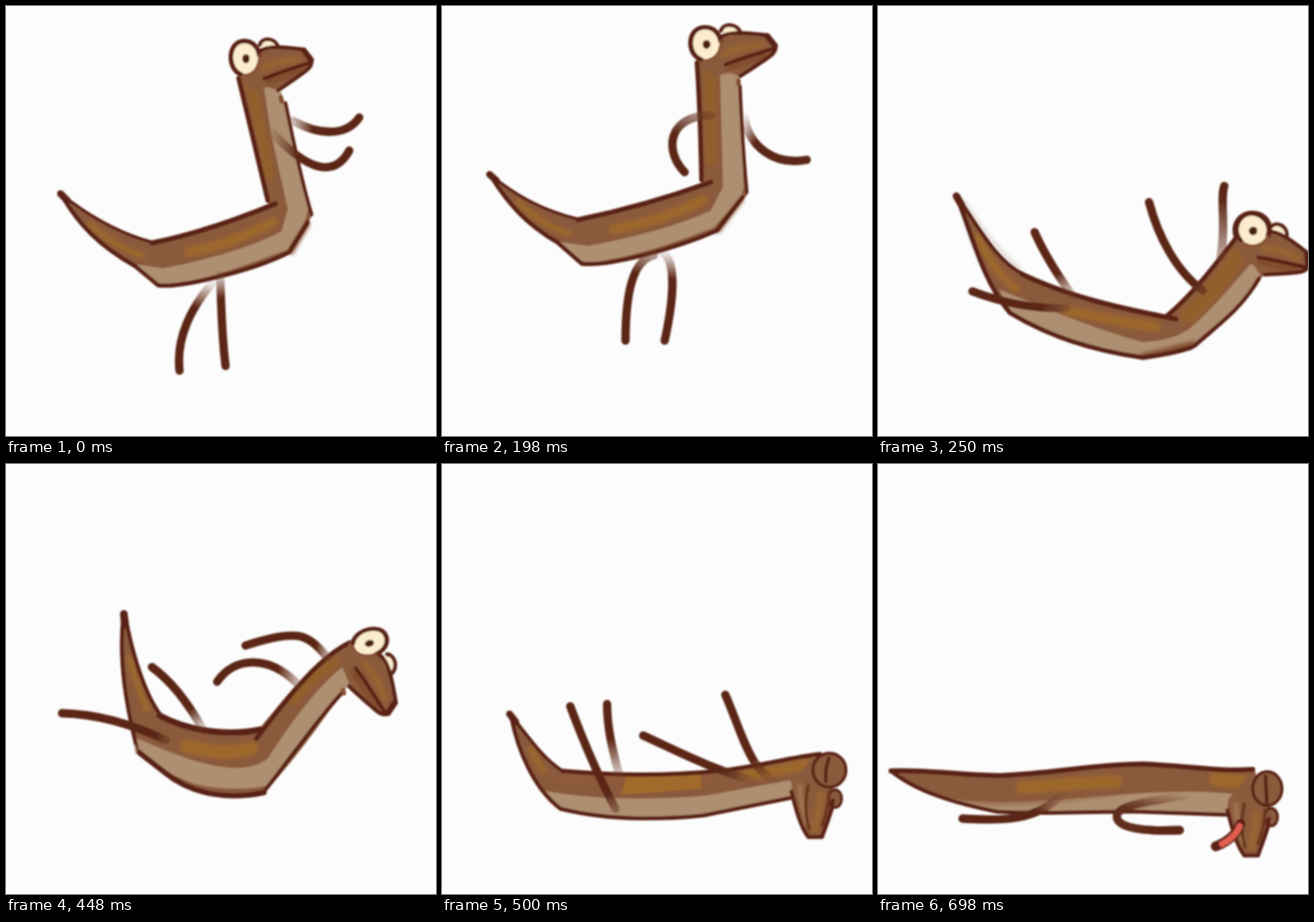
Write an HTML page that moves like this. It is 560 px wide and 559 px high and loops after 750 ms.

```html
<!DOCTYPE html>
<html lang="en">
<head>
<meta charset="utf-8">
<title>Collapsing lizard</title>
<style>
html, body { margin: 0; width: 100%; height: 100%; overflow: hidden; background: #fcfcfc; }
svg { display: block; width: 100%; height: 100%; }
path { stroke-linecap: round; stroke-linejoin: round; }
</style>
</head>
<body>
<svg id="stage" viewBox="0 0 560 559">
  <defs>
    <filter id="soft" filterUnits="userSpaceOnUse" x="-200" y="-200" width="960" height="960"><feGaussianBlur stdDeviation="0.85"/></filter>
    <filter id="smear" filterUnits="userSpaceOnUse" x="-200" y="-200" width="960" height="960"><feGaussianBlur stdDeviation="2"/></filter>
  </defs>
</svg>
<script>
const NS = 'http://www.w3.org/2000/svg';
const stage = document.getElementById('stage');
const defs = stage.querySelector('defs');
const INK = '#5a2413', BROWN = '#8b5a3c', BELLY = '#af8f71', OCHRE = '#a06a2b', CREAM = '#fdedcf';

function add(parent, tag, attrs) {
  const node = document.createElementNS(NS, tag);
  for (const key in attrs) node.setAttribute(key, attrs[key]);
  parent.appendChild(node);
  return node;
}

const fill = (d, color) => g => add(g, 'path', { d, fill: color });
const line = (d, width = 5, color = INK) => g =>
  add(g, 'path', { d, fill: 'none', stroke: color, 'stroke-width': width });
const glaze = (d, width, color = OCHRE, opacity = 0.85) => g =>
  add(g, 'path', { d, fill: 'none', stroke: color, 'stroke-width': width, opacity, filter: 'url(#smear)' });
const oval = (cx, cy, rx, ry, color, stroke = 'none', width = 0) => g =>
  add(g, 'ellipse', { cx, cy, rx, ry, fill: color, stroke, 'stroke-width': width });

// A limb runs from its tip to the body and fades out there.
let limbs = 0;
const limb = (d, end = 0.1, solid = 0.6) => g => {
  const n = d.match(/-?[\d.]+/g);
  const id = 'limb' + limbs++;
  const fade = add(defs, 'linearGradient', {
    id, gradientUnits: 'userSpaceOnUse', x1: n[0], y1: n[1], x2: n[n.length - 2], y2: n[n.length - 1]
  });
  add(fade, 'stop', { offset: solid, 'stop-color': '#5c2817' });
  add(fade, 'stop', { offset: 1, 'stop-color': '#6e3d28', 'stop-opacity': end });
  add(g, 'path', { d, fill: 'none', stroke: `url(#${id})`, 'stroke-width': 10.8 });
};

// Head with open eyes, placed by the centre of the near eye.
const head = (x, y, turn, { stretch = 1, eyeX = 1, eyeY = 1 } = {}) => g => {
  const place = `translate(${x} ${y}) rotate(${turn})`;
  const skull = add(g, 'g', { transform: `${place} scale(${stretch} 1)` });
  [
    fill('M-9 23L16 -6L38 -14L76 -11L88 3L81 15L42 42L30 38L10 42Z', BROWN),
    glaze('M24 13C40 5 55 2 68 2', 9, OCHRE, 0.6),
    glaze('M30 31C45 27 60 22 74 14', 6, '#7a4526', 0.8),
    oval(29, -17, 10, 6.5, CREAM),
    line('M19 -17C22 -27 39 -27 43 -14', 5),
    line('M18 -8C28 -17 52 -14 77 -11L87 2C87 9 84 13 80 16C67 26 55 34 43 42', 5),
    line('M76 -10L85 2', 7),
    line('M82 7C64 13 46 18 25 27', 5)
  ].forEach(draw => draw(skull));
  const eye = add(g, 'g', { transform: `${place} scale(${eyeX} ${eyeY})` });
  [
    oval(0, 0, 17.5, 20.5, CREAM),
    line('M-6 21C-24 14 -23 -22 -1 -22C10 -22 17 -13 18 -4', 6),
    line('M18 -4C19 10 12 20 2 22', 3, '#875130'),
    oval(1, 1, 4.8, 6, '#4c2111')
  ].forEach(draw => draw(eye));
};

// Head hanging down with closed eyes.
const droop = (dy, eyeX, eyeRx, lid) => g => {
  const h = add(g, 'g', { transform: `translate(0 ${dy})` });
  [
    fill('M456 412L484 380L506 392L512 445L496 486L477 487L455 428Z', BROWN),
    glaze('M466 418C466 438 472 455 476 468', 6, '#b08a66', 0.6),
    glaze('M493 430C492 446 489 462 486 474', 9, OCHRE, 0.7),
    oval(512, 435, 8.5, 11.5, BROWN, INK, 3.5),
    line('M455 426C461 449 467 472 477 485L495 485C500 469 508 454 509 437', 5),
    line('M477 418C472 438 473 456 478 474', 4, '#6a351e'),
    line('M504 426C504 443 500 456 495 470', 4, '#6a351e'),
    oval(eyeX, 398, eyeRx, 22, BROWN, INK, 4),
    line(lid, 4.5)
  ].forEach(draw => draw(h));
};

const poses = [
  { hold: 120, parts: [
    fill('M70 243C105 270 140 293 195 307C245 297 300 278 342 257L302 90L350 95L361 122L399 272L370 322C320 343 270 358 200 365L165 338C120 312 92 280 70 243Z', BROWN),
    fill('M336 106C350 100 360 108 361 122L394 262L389 280L366 317C310 337 262 357 200 364L163 335L205 341C262 330 320 314 359 293L367 264L345 165Z', BELLY),
    glaze('M318 102C326 135 335 175 343 220', 14, '#94602a'),
    glaze('M238 320C280 313 318 296 348 281', 13),
    glaze('M110 284C130 302 155 317 178 325', 8),
    glaze('M372 320L393 284', 6, '#85502f'),
    line('M71 244C105 271 145 295 190 307', 4),
    line('M190 308C245 297 300 278 351 257', 6.5),
    line('M303 94C315 145 330 205 341 253', 6),
    line('M72 245C95 285 122 312 168 338L198 363C225 367 320 345 369 320L393 281', 5.5),
    line('M364 126C373 170 384 225 398 271', 4.5),
    line('M71 244L80 253', 9),
    line('M358 119L359 124', 6, '#85502f'),
    head(311.5, 67.5, 0),
    limb('M460 145C442 171 405 167 373 149', 0.3, 0.7),
    limb('M447 188C428 223 393 216 346 163', 0.1, 0.6),
    limb('M226 474C221 430 243 390 268 361', 0.1, 0.7),
    limb('M286 468C281 430 280 390 279 350', 0.2, 0.75)
  ]},
  { hold: 130, parts: [
    fill('M61 218C95 245 130 265 182 277C235 266 300 247 338 230L331 68L382 76L388 98L398 245L358 294C310 314 270 326 215 336L180 336L148 307C112 287 84 253 61 218Z', BROWN),
    fill('M362 85C376 76 386 85 387 98L393 236L389 248L354 288C305 306 255 326 184 335L148 306L190 312C250 301 310 285 350 266L366 235Z', BELLY),
    glaze('M349 83C348 120 350 155 350 200', 14, '#94602a'),
    glaze('M224 290C268 283 308 268 340 252', 13),
    glaze('M99 255C118 273 142 289 166 296', 8),
    glaze('M360 292L390 252', 6, '#85502f'),
    line('M62 219C96 246 130 266 177 277', 4),
    line('M177 278C235 266 295 249 350 229', 6.5),
    line('M332 74C336 125 337 180 338 226', 6),
    line('M63 220C86 257 110 284 150 307L182 335C215 339 300 317 358 292L391 249', 5.5),
    line('M388 104C390 150 393 200 397 242', 4.5),
    line('M62 219L71 227', 9),
    line('M386 97L386 101', 6, '#85502f'),
    head(343.5, 49, 0, { stretch: 1.05, eyeX: 1.06, eyeY: 0.97 }),
    limb('M316 216C290 190 292 143 350 142', 0.5, 0.5),
    limb('M475 200C432 208 400 182 394 146', 0.1, 0.7),
    limb('M239 435C239 375 248 330 276 324', 0.5, 0.75),
    limb('M290 435C301 385 306 333 288 321', 0.1, 0.7)
  ]},
  { hold: 120, parts: [
    glaze('M112 254C133 285 156 318 184 341', 3, '#c9b5a7', 0.7),
    glaze('M111 272C119 305 128 325 140 348', 3, '#ddd5cf', 0.8),
    fill('M102 246C130 288 152 333 190 348C250 378 310 392 377 403C410 375 440 337 466 302L504 345C487 382 450 410 412 444L345 459C285 450 225 430 172 400C142 360 125 300 102 246Z', BROWN),
    fill('M158 369C205 386 270 417 345 437C375 435 390 430 405 420C438 392 468 355 487 333L498 350C475 390 440 412 410 440L345 456C285 447 225 427 173 397Z', BELLY),
    glaze('M245 396C285 402 325 414 362 417', 13),
    glaze('M404 402C427 382 448 356 467 327', 22, '#946029'),
    glaze('M130 300C142 327 157 350 180 368', 10),
    glaze('M345 455L410 439', 7, '#7c4728'),
    line('M103 247C131 288 155 333 190 349', 5),
    line('M188 349C250 378 310 392 388 407', 6.5),
    line('M376 403C410 375 440 335 465 303', 6),
    line('M103 248C124 304 138 360 172 399C225 431 285 449 345 457C370 454 390 450 408 444', 6),
    line('M412 442C443 415 475 392 496 354', 5),
    line('M102 247L109 259', 9.5),
    head(488, 291, 31, { eyeX: 1.17, eyeY: 0.93 }),
    line('M466 301C460 281 473 269 488 269C503 269 513 281 510 295', 5.5),
    limb('M204 294C216 321 232 347 252 375', 0.25, 0.65),
    limb('M123 371C160 385 200 394 245 393', 0.5, 0.75),
    limb('M353 255C365 300 388 344 423 370', 0.95, 0.9),
    limb('M451 234C445 250 454 288 446 326', 0.45, 0.2)
  ]},
  { hold: 130, parts: [
    fill('M153 193C163 235 182 300 201 326C245 347 290 351 330 344C365 302 405 249 448 231L477 260L444 288C415 330 380 380 336 428C290 440 245 431 205 403L170 376C155 315 142 255 153 193Z', BROWN),
    fill('M169 356C205 371 250 392 292 395C315 396 335 391 343 380C370 338 405 290 438 264L447 286C420 325 385 365 340 418C315 424 270 424 240 414L206 399L172 374Z', BELLY),
    glaze('M236 367C265 375 295 376 320 370', 18),
    glaze('M374 306C388 290 406 272 428 257', 14, '#946029'),
    glaze('M161 252C168 278 175 300 184 319', 8),
    line('M156 200C163 240 180 300 202 327', 5),
    line('M200 327C240 348 290 354 332 345', 8),
    line('M326 357C360 313 405 252 448 232', 6),
    line('M153 196C146 255 157 315 170 368', 5),
    line('M172 374L208 402C245 432 295 436 336 427', 7),
    line('M336 426C370 383 405 333 437 298', 5),
    line('M153.5 195L155 209', 10),
    line('M439 294L440 298', 6, '#85502f'),
    line('M168 366L170 376', 2, BELLY),
    head(474, 232, 74, { stretch: 1.1, eyeX: 0.91, eyeY: 1.02 }),
    limb('M312 236C345 225 368 221 383 224C398 228 407 238 418 251', 0.45, 0.85),
    limb('M275 283C297 251 341 247 380 286', 0.35, 0.75),
    limb('M190 264C215 282 238 312 257 346', 0.15, 0.7),
    limb('M73 324C115 325 162 337 208 359', 0.75, 0.9)
  ]},
  { hold: 120, parts: [
    fill('M88 324C110 352 130 382 160 399C235 405 300 405 360 399C410 394 450 382 490 377L500 418L455 434L340 458C270 465 205 461 154 451C115 420 98 372 88 324Z', BROWN),
    fill('M134 425C200 437 270 437 345 431L453 411L465 432L340 455C270 462 205 459 157 449Z', BELLY),
    glaze('M150 410L345 411', 12, '#905a3d', 0.7),
    fill('M240 406L337 404L338 422L233 430Z', OCHRE),
    glaze('M395 404C425 402 450 396 477 390', 14),
    glaze('M116 371C121 382 126 391 133 399', 8),
    line('M90 327C112 354 130 382 158 400', 4.5),
    line('M158 399C235 406 300 405 360 399C410 394 450 382 492 377', 5.5),
    line('M90 328C99 374 120 422 154 448C205 461 270 464 340 457L454 434', 5),
    line('M88 325L96 335', 9),
    droop(0, 504.5, 21.5, 'M504 382C500 393 499 403 500 413'),
    limb('M167 315C184 360 201 402 226 448', 0.6, 0.85),
    limb('M215 312C215 345 223 374 230 402', 0.3, 0.5),
    limb('M262 353C300 370 350 397 408 412', 0.1, 0.7),
    limb('M369 300C382 329 393 367 408 389C415 400 424 407 435 413', 0.05, 0.7)
  ]},
  { hold: 130, parts: [
    fill('M15 398C65 397 110 405 160 405C230 402 285 388 345 388C400 390 440 398 490 396L500 425L456 457L340 453C280 453 220 457 155 454C100 444 50 426 15 398Z', BROWN),
    fill('M95 435C155 445 225 437 290 432C350 427 410 423 462 429L462 456L340 452L155 452Z', BELLY),
    glaze('M188 420C220 420 265 413 310 413', 17),
    glaze('M440 410L476 414', 18),
    glaze('M110 438C170 447 245 436 315 427', 6, BROWN, 0.5),
    line('M17 399C65 397 110 405 160 405C230 402 285 390 345 390C400 392 440 400 488 397', 6.5),
    line('M17 399C50 426 100 441 155 452C220 456 280 451 340 452L453 456', 5),
    droop(24, 507, 19, 'M505 382C504 394 507 406 506 417'),
    line('M472 468C468 480 456 491 440 497', 13),
    line('M471 471C467 481 458 489 448 494', 8, '#e15d50'),
    limb('M110 461C160 464 207 465 241 428', 0.1, 0.7),
    limb('M393 476C350 478 311 474 311 458C311 443 350 440 402 430', 0.02, 0.3),
    limb('M393 476C350 478 311 474 311 458C311 450 325 445 342 441', 0.25, 0.5)
  ]}
];

for (const pose of poses) {
  pose.group = add(stage, 'g', { filter: 'url(#soft)', visibility: 'hidden' });
  pose.parts.forEach(draw => draw(pose.group));
}
const loop = poses.reduce((sum, pose) => sum + pose.hold, 0);

function render(time) {
  let left = time % loop;
  let shown = 0;
  while (left >= poses[shown].hold) left -= poses[shown++].hold;
  poses.forEach((pose, i) => pose.group.setAttribute('visibility', i === shown ? 'visible' : 'hidden'));
}

let start;
function tick(now) {
  start ??= now;
  render(Math.max(0, now - start));
  requestAnimationFrame(tick);
}
render(0);
requestAnimationFrame(tick);
</script>
</body>
</html>
```
